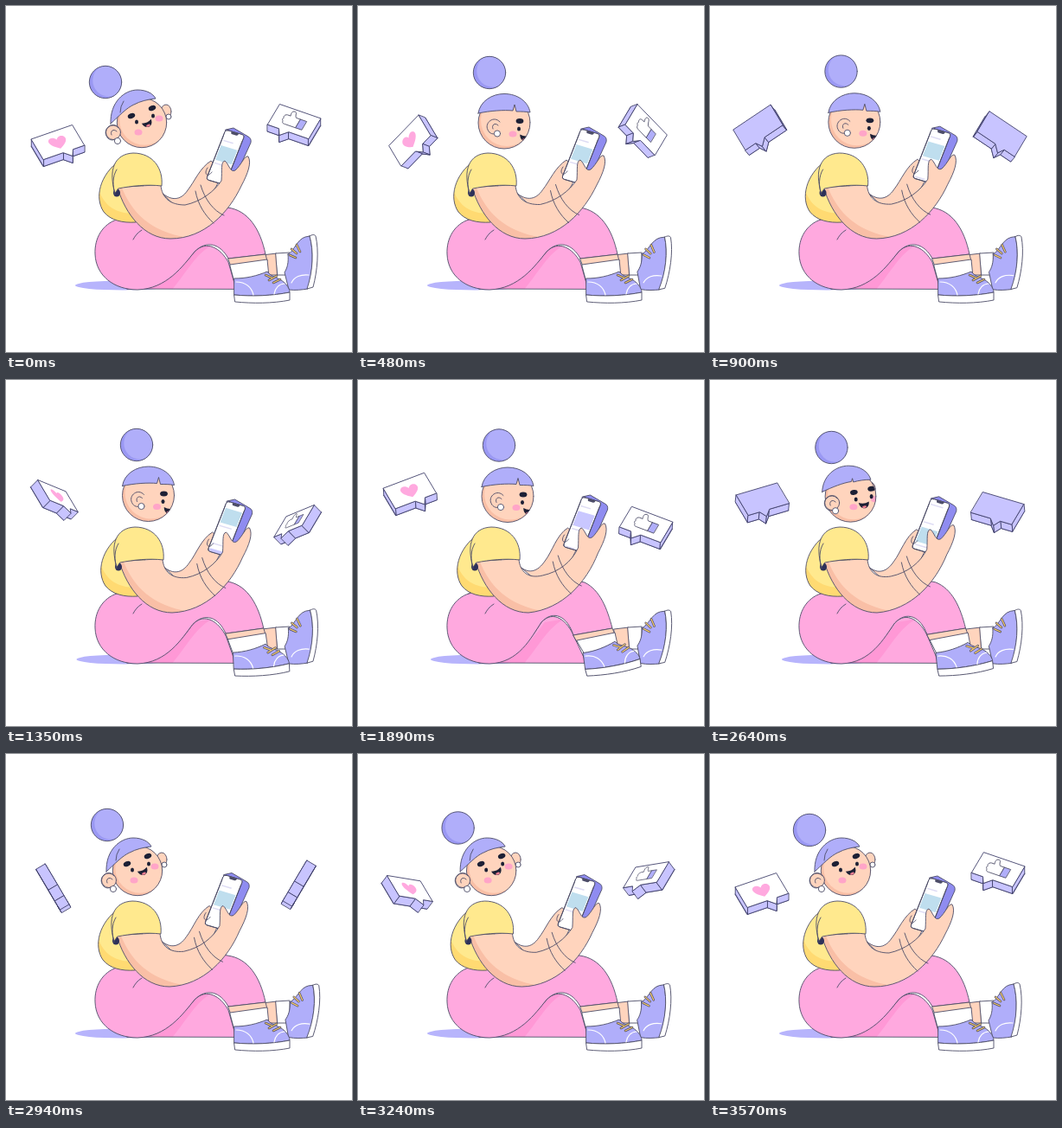
An HTML page with a canvas that plays this animation: 400x400 px, repeating every 3.6 s.

```html
<!DOCTYPE html>
<html lang="en">
<head>
<meta charset="utf-8">
<style>
  html, body { margin: 0; height: 100%; overflow: hidden; background: #fff; }
  canvas { display: block; width: 400px; height: 400px; }
</style>
</head>
<body>
<canvas id="stage" width="400" height="400"></canvas>
<script>
const ctx = document.getElementById('stage').getContext('2d');
const LOOP = 3600, TIMES = [0, 480, 1350, 1890, 2340, 2940, LOOP];
const INK = '#4d4d68', DARK = '#1d2035', LILAC = '#b0aefa', VIOLET = '#9a98f3', PALE = '#c8c4ff', SKIN = '#ffd4bd',
      TAN = '#f9bfa6', PINK = '#ffa9df', ROSE = '#ff98d6', YELLOW = '#ffe98e', GOLD = '#ffda72';

// Monotone cubic through the given values
function track(t, values, times = TIMES) {
  const slope = i => (values[i + 1] - values[i]) / (times[i + 1] - times[i]);
  const tangent = i => {
    if (i === 0 || i === times.length - 1) return 0;
    const a = slope(i - 1), b = slope(i);
    return a * b > 0 ? 2 * a * b / (a + b) : 0;
  };
  let i = 0;
  while (i < times.length - 2 && t >= times[i + 1]) i++;
  const h = times[i + 1] - times[i], x = (t - times[i]) / h, y = 1 - x;
  return values[i] * y * y * (1 + 2 * x) + values[i + 1] * x * x * (3 - 2 * x)
    + h * x * y * (tangent(i) * y - tangent(i + 1) * x);
}

const mix = (a, b, k) => a + (b - a) * k;

// Blend two path strings with the same commands
function morph(a, b, k) {
  const target = b.match(/-?[\d.]+/g);
  let i = 0;
  return a.replace(/-?[\d.]+/g, n => mix(+n, +target[i++], k).toFixed(2));
}

function draw(d, fill, stroke = INK, width = .9) {
  const path = typeof d === 'string' ? new Path2D(d) : d;
  if (fill) { ctx.fillStyle = fill; ctx.fill(path); }
  if (stroke) { ctx.strokeStyle = stroke; ctx.lineWidth = width; ctx.stroke(path); }
}

function oval(x, y, rx, ry, fill, stroke = null, angle = 0) {
  const path = new Path2D();
  path.ellipse(x, y, rx, ry, angle, 0, 7);
  draw(path, fill, stroke);
}

function group(paint) { ctx.save(); paint(); ctx.restore(); }

function shaded(d, fill, shade, shadeFill) {
  draw(d, fill, null);
  group(() => { ctx.clip(new Path2D(d)); draw(shade, shadeFill, null); });
  draw(d, null);
}

// Disc with a crescent of shade along one side
function ball(x, y, r, dx, dy, fill, shadeFill) {
  oval(x, y, r, r, shadeFill);
  group(() => {
    const disc = new Path2D();
    disc.arc(x, y, r, 0, 7);
    ctx.clip(disc);
    oval(x + dx, y + dy, r, r, fill);
  });
}

function turnAbout(x, y, degrees) {
  ctx.translate(x, y);
  ctx.rotate(degrees * Math.PI / 180);
  ctx.translate(-x, -y);
}

const BUBBLE = [[-26, -17], [26, -17], [26, 17], [11.5, 17], [6.8, 26], [-1, 17], [-26, 17]];

// Extruded speech bubble spinning about its own vertical axis
function bubble(y, degrees, mirrored, icon) {
  const a = degrees * Math.PI / 180, c = Math.cos(a), s = Math.sin(a);
  const U = [.91 * c, -.316 * c - .645 * s], V = [.414, .695];
  const W = [.91 * s * 12.4, (.645 * c - .316 * s) * 12.4];
  const front = BUBBLE.map(([u, v]) => [U[0] * u + V[0] * v, U[1] * u + V[1] * v]);
  const back = front.map(p => [p[0] + W[0], p[1] + W[1]]);
  const poly = (points, fill) => draw('M' + points.join('L') + 'Z', fill, '#42426c');
  const facing = U[0] * V[1] - U[1] * V[0] > 0;
  group(() => {
    if (mirrored) { ctx.translate(393, 0); ctx.scale(-1, 1); }
    ctx.translate(60, y);
    poly(facing ? back : front, PALE);
    front.forEach((p, i) => {
      const j = (i + 1) % front.length, q = front[j];
      if ((q[0] - p[0]) * W[1] - (q[1] - p[1]) * W[0] < 0) poly([p, q, back[j], back[i]], PALE);
    });
    if (!facing) return poly(back, PALE);
    poly(front, '#fff');
    ctx.transform(...U, ...V, 0, 0);
    icon();
  });
}

function heart() {
  ctx.rotate(.1);
  draw('M0 10C-6 6 -12 0 -10 -5C-8 -10 -2 -9 0 -4C2 -9 8 -10 10 -5C12 0 6 6 0 10Z', PINK, null);
}

function thumb() {
  draw('M-13 -6H-5V8H-13Z', LILAC);
  draw('M-5 -6H0C3 -9 2 -14 5 -14C9 -14 8 -9 7 -6H11C15 -5 14 -1 13 0C15 3 12 4 12 5C12 8 10 8 8 8H-5Z', '#fff');
}

function laces(d) {
  draw(d, null, INK, 2.6);
  draw(d, null, '#f3c969', 1.3);
}

function legs(k, tap) {
  oval(135 + 4 * k, 323, 55, 5.5, '#b7b4fc');
  draw('M296 288L313 286L314 311L300 311Z', SKIN);
  draw('M312 286L328 285L328 311L314 311Z', '#fff');
  group(() => {
    turnAbout(334, 322, 4 * tap);
    draw('M326 287C333 284 336 270 346 267L351 266C356 283 355 306 349 327C342 328 335 329 327 328L322 308C325 303 327 297 326 287Z', LILAC);
    draw('M351 266C354 264 357 264 358 266C362 283 360 306 355 325L348 327C355 306 356 283 351 266Z', '#fff');
    draw('M330 320C333 313 341 310 350 311', null, '#fff', 1.2);
    laces('M330 281l6 5M336 276l4 8M328 288l7 3');
  });

  const far = morph('M140 327C185 326 205 300 218 284C232 270 248 280 257 296L266 327Z',
                    'M140 327C185 326 200 298 212 280C226 265 242 278 250 297L264 327Z', k);
  shaded(far, PINK, 'M140 330C185 326 205 295 216 280L240 276C220 284 208 310 190 330Z', ROSE);
  const near = morph(
    'M128 247C112 252 102 268 103 287C104 312 125 328 152 328C186 327 205 300 218 284C232 270 248 275 257 292L300 287C294 258 280 236 256 233C220 225 160 238 128 247Z',
    'M128 247C112 252 102 268 103 287C104 312 125 328 152 328C186 327 200 298 212 280C226 265 242 273 249 295L294 287C288 264 280 243 262 234C220 225 160 238 128 247Z', k);
  draw(near, PINK);
  draw('M147 270C149 266 152 262 157 259', null);

  draw(morph('M257 292L300 287L302 295L260 300Z', 'M249 295L294 287L297 294L253 302Z', k), SKIN);
  draw(morph('M259 299L302 293L304 313L264 318Z', 'M253 301L297 292L301 310L263 318Z', k), '#fff');
  group(() => {
    turnAbout(266, 341, -8 * k);
    draw('M264 315C278 315 290 312 302 307C306 313 316 314 322 320C326 324 328 328 328 331C308 335 284 336 264 334Z', LILAC);
    draw('M264 334C285 336 308 335 328 331L328 340C308 344 285 344 265 342Z', '#fff');
    draw('M266 319C277 319 284 325 286 334M310 333C311 326 316 321 322 321', null, '#fff', 1.2);
    laces('M300 311l7 3M304 317l9 -5M309 320l8 -4');
  });
}

function phone(x, y, scroll) {
  group(() => {
    ctx.translate(x, y);
    draw('M254 143L263 141L280 151Q284 153 283 158L269 189Q266 193 260 191L252 201Z', '#8f8cf0');
    ctx.translate(254, 143);
    ctx.transform(.95, .28, -.364, .927, 0, 0);
    const face = new Path2D();
    face.roundRect(0, 0, 23, 62, 3);
    draw(face, '#fff');
    group(() => {
      ctx.clip(face);
      for (let i = -1; i < 4; i++) {
        const top = 19 + 50 * i - scroll;
        ctx.fillStyle = i & 1 ? '#c9c7ff' : '#bfdeee';
        ctx.fillRect(1.5, top, 20, 18);
        ctx.fillStyle = '#dedcf4';
        ctx.fillRect(2, top - 7, 12, 1.5);
        ctx.fillRect(2, top + 21, 15, 1.5);
      }
      ctx.fillStyle = '#fff';
      ctx.fillRect(0, 0, 23, 6);
    });
    draw('M7 0H16Q16 3 14 3H9Q7 3 7 0Z', INK, null);
    draw(face, null);
  });
}

function torso(s, px, py, scroll) {
  const S = (x, y) => `${x + s} ${y} `;
  const P = (x, y) => `${x + px} ${y + py} `;
  const M = (x, y) => `${x + (s + px) / 2} ${y + py / 2} `;

  // Far arm
  draw(`M${S(176, 212)}C${S(190, 227)}${M(202, 225)}${M(210, 213)}C${M(218, 203)}${P(224, 187)}${P(237, 179)}L${P(250, 190)}C${M(246, 210)}${M(230, 232)}${M(205, 240)}Z`, SKIN);
  // Shirt back
  shaded(`M${S(132, 178)}C${S(108, 195)}${S(102, 222)}${S(113, 238)}C${S(121, 248)}${S(135, 251)}${S(150, 250)}L${S(160, 200)}Z`,
    YELLOW, `M${S(107, 212)}C${S(114, 232)}${S(127, 240)}${S(150, 240)}V256H100Z`, GOLD);
  phone(px, py, scroll);

  // Near arm and hand
  shaded(`M${S(129, 210)}C${S(138, 241)}${S(160, 269)}${S(190, 269)}C${M(230, 269)}${M(258, 238)}${P(272, 208)}C${P(280, 193)}${P(284, 181)}${P(280, 174)}C${P(276, 172)}${P(272, 184)}${P(265, 190)}C${P(259, 193)}${P(258, 183)}${P(253, 179)}C${P(248, 180)}${P(250, 190)}${P(249, 202)}C${M(241, 214)}${M(226, 226)}${M(207, 230)}C${S(190, 230)}${S(180, 222)}${S(179, 207)}Z`,
    SKIN, `M${S(133, 208)}C${S(146, 240)}${S(166, 260)}${S(210, 268)}V280H110Z`, TAN);
  draw(`M${P(233, 187)}C${P(228, 194)}${P(233, 199)}${P(238, 192)}M${M(219, 214)}C${M(222, 230)}${M(230, 242)}${M(240, 251)}M${M(225, 207)}C${M(230, 224)}${M(240, 237)}${M(252, 242)}`, null);

  // Sleeve
  oval(128 + s, 216, 4, 4.5, '#2d3159');
  draw(`M${S(126, 216)}C${S(118, 190)}${S(125, 171)}${S(147, 170)}C${S(170, 170)}${S(182, 188)}${S(180, 208)}C${S(163, 206)}${S(145, 208)}${S(130, 211)}Z`, YELLOW);
  draw(`M${S(128, 189)}C${S(123, 197)}${S(123, 208)}${S(126, 218)}`, null);
}

function head(x, y, k, bunX, bunY) {
  ball(bunX, bunY, 18.7, 4, -2, LILAC, VIOLET);
  oval(bunX, bunY, 18.7, 18.7, null, INK);
  const at = (x0, y0, x1, y1) => [mix(x0, x1, k), mix(y0, y1, k)];
  group(() => {
    ctx.translate(x, y);
    oval(...at(28, -13, 18, -5), 6, 8, SKIN, INK);
    if (k < .7) oval(...at(31, -7, 16, -2), 3, 3, '#fff', INK);

    const r = mix(28.7, 30, k), face = new Path2D();
    face.arc(0, 0, r, 0, 7);
    ball(0, 0, r, 3, -3, SKIN, TAN);
    group(() => {
      ctx.clip(face);
      const tilt = mix(-.4, 0, k);
      oval(...at(-4, 11, 10, 13), 4.5, 3.5, '#ffa5c8');
      oval(...at(20, -5, 35, 10), 4.5, 3.5, '#ffa5c8');
      oval(...at(-12, -8, 18, -2), 4.4, 2.9, DARK, null, tilt);
      oval(...at(12, -17, 35, -2), 4.4, 2.9, DARK, null, tilt);
      oval(...at(-6, -1, 17, 7), 2, 2.6, DARK);
      oval(...at(13, -8, 34, 7), 2, 2.6, DARK);
      group(() => {
        ctx.translate(...at(6, 0, 24, 16));
        ctx.rotate(mix(-.42, .1, k));
        draw('M-6 -2Q0 1 6 -2C6 7 -5 8 -6 -2Z', DARK, null);
        oval(0, 3.5, 2.5, 1.3, '#ef7f92');
      });
    });
    draw(face, null);

    draw(morph(
      'M-36 1C-37 -24 -20 -38 -5 -38C5 -38 13 -34 16 -28C7 -27 -2 -25 -9 -21L-9.1 -21L-9.2 -21C-18 -17 -26 -8 -36 1Z',
      'M-30 -11C-28 -25 -14 -33.5 0 -33.5C16 -33.5 28 -24 30 -12C25 -13 20 -13 14 -13L12 -21L10 -14C0 -15 -16 -14 -30 -11Z', k), LILAC);
    if (k < .5) draw('M-25 -12Q-25 -19 -21 -25', null);

    const [ex, ey] = at(-33, 11, -11, 4);
    oval(ex, ey, 8.5, 8.5, SKIN, k < .6 ? INK : null);
    draw(`M${ex + 6} ${ey - 5}C${ex - 1} ${ey - 13} ${ex - 12} ${ey - 4} ${ex - 8} ${ey + 4}C${ex - 6} ${ey + 9} ${ex - 1} ${ey + 10} ${ex + 2} ${ey + 8}M${ex + 4} ${ey - 1}C${ex} ${ey - 5} ${ex - 4} ${ey - 1} ${ex - 2} ${ey + 3}`, null);
    oval(...at(-28, 21, -8, 12.5), 3.6, 3.6, '#fff', INK);
  });
}

function render(t) {
  ctx.clearRect(0, 0, 400, 400);
  ctx.lineJoin = ctx.lineCap = 'round';
  const key = (...values) => track(t, values);

  legs(track(t, [0, 0, 1, 1, 0, 0], [0, 1090, 1720, 2500, 2930, LOOP]),
       (1 - Math.cos(t / 600 * Math.PI)) / 2);
  torso(key(0, 3, 2, 7, 7, -1, 0),
        key(0, 4, 1.5, 5.5, 5.5, -2, 0), key(0, -1, -3, -8, -8, -3.5, 0),
        key(0, 0, 11, 52, 63, 100, 100));
  head(key(157, 169, 164.5, 173, 173, 152, 157), key(135, 135, 133.5, 134.5, 134.5, 135, 135),
       track(t, [0, 0, 1, 1, 0, 0], [0, 90, 450, 2400, 2900, LOOP]),
       key(115, 152, 151, 163, 163, 117, 115), key(88, 77, 75, 75.5, 75.5, 82, 88));

  const spin = track(t % 1800, [0, 44, 54, 289, 313, 360], [0, 480, 540, 1140, 1350, 1800]);
  bubble(key(157.5, 155.5, 134, 128, 138.5, 152, 157.5), spin, false, heart);
  bubble(key(133.5, 143, 163, 167, 163.5, 148, 133.5), spin, true, thumb);
}

const start = performance.now();
function tick() {
  const t = (performance.now() - start) % LOOP;
  render(Math.floor(t / 30) * 30);
  requestAnimationFrame(tick);
}
tick();
</script>
</body>
</html>
```
